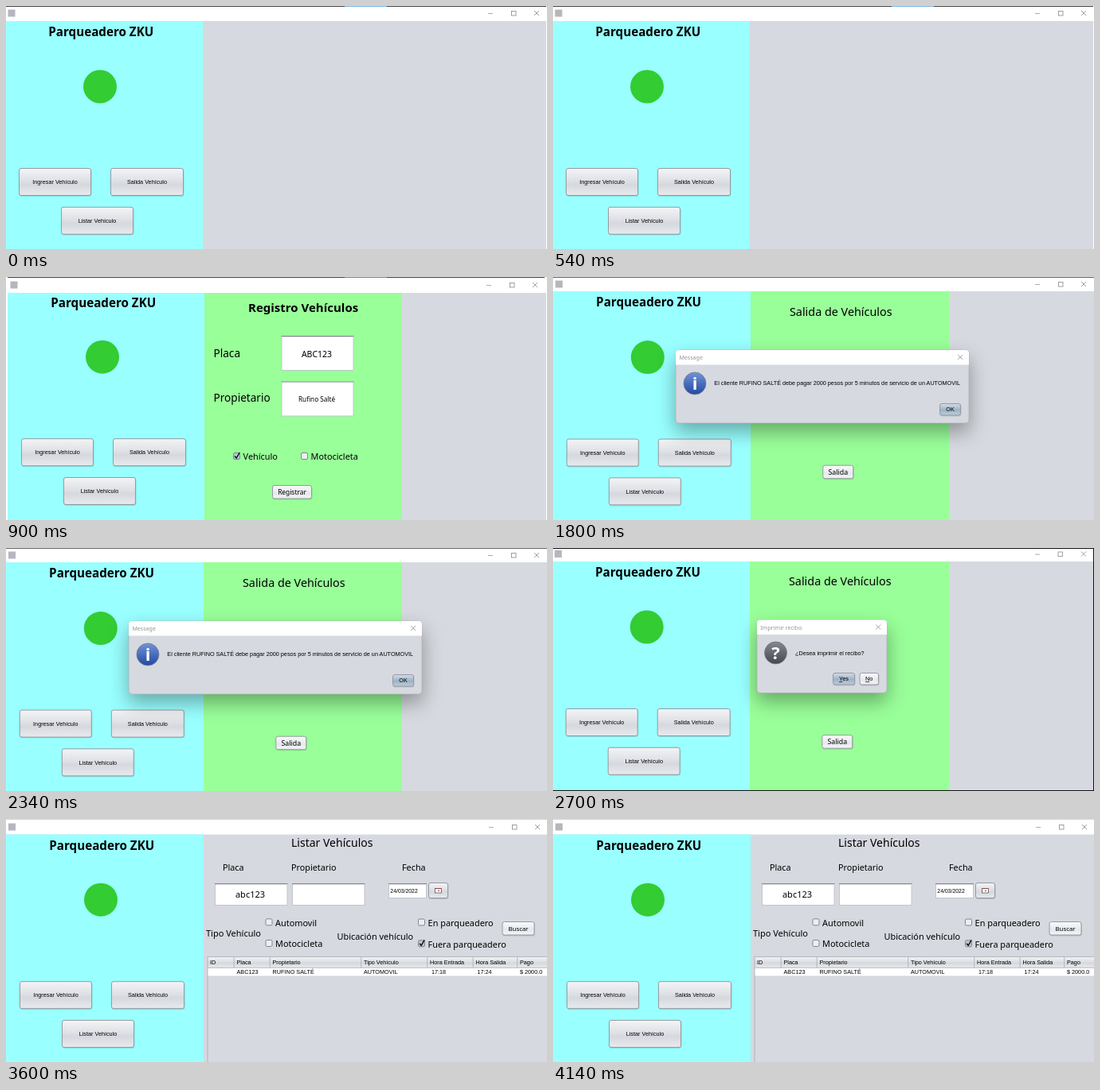
An HTML page that plays this animation: 679 px wide and 306 px high, repeating every 4.5 s.

```html
<!DOCTYPE html>
<html lang="es">
<head>
<meta charset="utf-8">
<title>Parqueadero</title>
<style>
  html, body { margin: 0; width: 100%; height: 100%; overflow: hidden; background: #fff; }
  svg { display: block; width: 679px; height: 306px; }
  text { font-family: "Noto Sans", sans-serif; white-space: pre; }
  .arial { font-family: "Liberation Sans", Arial, sans-serif; }
  .bold { font-weight: bold; }
  .mid { text-anchor: middle; }
  .grey { fill: #959595; }
  .shadow { filter: drop-shadow(0 11px 12px #0005); }
</style>
</head>
<body>
<svg id="stage" viewBox="0 0 679 306">
  <defs>
    <linearGradient id="button" x2="0" y2="1">
      <stop stop-color="#f3f4f6"/><stop offset=".45" stop-color="#dfe1e6"/>
      <stop offset=".6" stop-color="#d5d8de"/><stop offset="1" stop-color="#e8eaed"/>
    </linearGradient>
    <linearGradient id="light" x2="0" y2="1">
      <stop stop-color="#fafafb"/><stop offset=".6" stop-color="#e6e8ec"/><stop offset="1" stop-color="#f4f5f7"/>
    </linearGradient>
    <linearGradient id="active" x2="0" y2="1">
      <stop stop-color="#d3dde7"/><stop offset=".55" stop-color="#9db2c6"/><stop offset="1" stop-color="#bccddb"/>
    </linearGradient>
    <linearGradient id="info" x2="0" y2="1"><stop stop-color="#6f94d8"/><stop offset="1" stop-color="#2348a4"/></linearGradient>
    <linearGradient id="question" x2="0" y2="1"><stop stop-color="#85888e"/><stop offset="1" stop-color="#45484e"/></linearGradient>
  </defs>
</svg>
<script>
const STEP = 900, SMALL = 7.25;
const CYAN = '#99ffff', GREEN = '#99ff99', GREY = '#d6d9df';

const rect = (x, y, w, h, fill, extra = '') =>
  `<rect x="${x}" y="${y}" width="${w}" height="${h}" fill="${fill}" ${extra}/>`;
const path = (d, color, width = 1) =>
  `<path d="${d}" fill="none" stroke="${color}" stroke-width="${width}"/>`;
const text = (x, y, size, str, cls = '') =>
  `<text x="${x}" y="${y}" font-size="${size}" class="${cls}">${str}</text>`;
const arial = (x, y, str, cls = '') => text(x, y, SMALL, str, 'arial ' + cls);
const move = (x, y, body) => `<g transform="translate(${x} ${y})">${body}</g>`;
const cross = (x, y, color) => path(`M${x - 3} ${y - 3}l6 6m0 -6l-6 6`, color, .8);

function button(x, y, w, h, label, size = SMALL, cls = 'arial', fill = 'button') {
  return rect(x + .5, y + 1, w, h, '#0002', 'rx="3"') +
    rect(x + .5, y + .5, w - 1, h - 1, `url(#${fill})`, 'rx="2.5" stroke="#969aa2"') +
    text(x + w / 2, y + h / 2 + size * .36, size, label, cls + ' mid');
}

const smallButton = (x, y, w, label, size) => button(x, y, w, 17.5, label, size, '', 'light');

const field = (x, y, w, h) =>
  rect(x + .5, y + .5, w - 1, h - 1, '#fff', 'stroke="#c3c6cc"') +
  path(`M${x} ${y + .5}h${w}`, '#84878d') + path(`M${x + 1} ${y + 1.5}h${w - 2}`, '#dcdee1');

const check = (x, y, label, on) =>
  rect(x + .5, y + .5, 8, 8, on ? '#b9c9d8' : '#eceef1', 'rx="1.5" stroke="#80858e"') +
  (on ? path(`M${x + 2} ${y + 4.5}l2.2 2.5l4 -7`, '#111', 1.5) : '') +
  text(x + 12.6, y + 9.3, 10.9, label);

// Window chrome and the left menu; "dx, dy" shift the menu slightly between screens.
function shell({ left = 0, top, split, dx, dy, titleY, icon, controls, body = '' }) {
  const [min, max, close, y] = controls;
  return rect(0, 0, 679, 306, '#fff') +
    rect(left, top, 679, 306, GREY) + rect(left, top, split - left, 306, CYAN) +
    rect(icon - 4.5, y - 4.5, 9, 9, '#b4b7bd') +
    path(`M${min - 3} ${y + .5}h6`, '#999', .8) +
    rect(max - 2.5, y - 2.5, 5.5, 5.5, 'none', 'stroke="#888" stroke-width=".8"') +
    cross(close, y, '#888') +
    text(53.3 + dx, titleY, 15.2, 'Parqueadero ZKU', 'bold') +
    move(dx, dy, '<circle cx="118" cy="101.5" r="21" fill="#33cc33"/>' +
      button(16, 204, 91, 35, 'Ingresar Vehículo') +
      button(131, 204, 92, 35, 'Salida Vehículo') +
      button(69, 252.8, 91, 35, 'Listar Vehículo')) +
    body;
}

const dialog = (x, y, w, h, title, body) =>
  `<g class="shadow">${rect(x, y, w, h, GREY, 'rx="4" stroke="#a8abb0" stroke-width=".6"')}</g>` +
  `<path d="M${x} ${y + 18.5}v-14.5q0 -4 4 -4h${w - 8}q4 0 4 4v14.5z" fill="#fff"/>` +
  text(x + 4.4, y + 12, 7.1, title, 'grey') + cross(x + w - 10.8, y + 9, '#888') + body;

const badge = (x, y, fill, sign) =>
  `<circle cx="${x}" cy="${y}" r="14" fill="url(#${fill})" stroke="#777c88" stroke-width=".8"/>` +
  `<g fill="#fff">${text(x, y + 8, 22, sign, 'bold mid')}</g>`;

const exitPanel = (left, top, x, y) =>
  rect(left, top, 497 - left, 306, GREEN) +
  text(x, y, 14.35, 'Salida de Vehículos') +
  smallButton(x + 41.3, y + 188, 39, 'Salida', 8.8);

const topLine = color => path('M0 .5H679', color);

const home = shell({
  top: 19, split: 247, dx: 0, dy: 0, titleY: 38, icon: 7, controls: [608, 637, 666, 9],
  body: topLine('#444') + path('M425 .5h53', '#78b4e6') + rect(678, 0, 1, 306, '#fff')
});

const register = shell({
  left: 2, top: 20, split: 249, dx: 3, dy: -.8, titleY: 38.3, icon: 10, controls: [606, 635, 664, 10],
  body: path('M2 .5H676', '#444') + path('M425 .5h53', '#5b8fc0') + rect(676, 0, 3, 20, '#fff') +
    rect(678, 0, 1, 306, '#fff') + rect(249, 20, 247, 286, GREEN) +
    text(304, 43.5, 15, 'Registro Vehículos', 'bold') +
    text(260.5, 101, 13.6, 'Placa') + text(260.5, 157, 13.6, 'Propietario') +
    field(345.5, 74, 91, 44) + field(345.5, 131.5, 91, 44) +
    text(390, 100.5, 10.5, 'ABC123', 'mid') + text(390, 157, 8.2, 'Rufino Salté', 'mid') +
    check(285, 221, 'Vehículo', true) + check(370, 221, 'Motocicleta') +
    smallButton(334, 262, 50, 'Registrar', 8.4)
});

const message = shell({
  top: 18, split: 248, dx: .8, dy: -.4, titleY: 37.2, icon: 7.5, controls: [608, 637, 666, 9],
  body: topLine('#666') + exitPanel(248, 18, 297, 48.7) +
    dialog(154, 92, 368, 92, 'Message',
      badge(178, 134, 'info', 'i') +
      arial(202.3, 136.3, 'El cliente RUFINO SALTÉ debe pagar 2000 pesos por 5 minutos de servicio de un AUTOMOVIL') +
      button(485, 159, 27, 15.5, 'OK', SMALL, 'arial', 'active'))
});

const receipt = shell({
  top: 17, split: 247, dx: -.3, dy: -2, titleY: 35.8, icon: 6.5, controls: [608, 636.5, 666, 7.5],
  body: topLine('#111') + exitPanel(247, 17, 296, 47.2) +
    path('M678.5 0V306M0 305.5H679', '#111') +
    dialog(256, 90.5, 163, 92, 'Imprimir recibo',
      badge(279.5, 132, 'question', '?') +
      arial(304, 135, '¿Desea imprimir el recibo?') +
      button(351, 157, 28, 15.5, '<tspan text-decoration="underline">Y</tspan>es', SMALL, 'arial', 'active') +
      button(384.5, 157, 24.5, 15.5, '<tspan text-decoration="underline">N</tspan>o', SMALL, 'arial', 'light'))
});

const columns = [
  [256, 'ID', ''], [289.5, 'Placa', 'ABC123'], [334.5, 'Propietario', 'RUFINO SALTÉ'],
  [449, 'Tipo Vehículo', 'AUTOMOVIL'], [532, 'Hora Entrada', ' 17:18'],
  [589.5, 'Hora Salida', ' 17:24'], [645, 'Pago', '$ 2000.0']
];
const table = rect(253, 173, 426, 14, 'url(#button)') + rect(253, 187, 426, 10.5, '#fff') +
  path('M253 306V173.5H679M253 187.3H679', '#a4a8b0', .8) +
  columns.map(([x, head, cell], i) =>
    (i ? path(`M${x - 3.3} 174v13`, '#a9adb5', .8) : '') +
    arial(x, 183, head) + arial(x, 194.7, cell)).join('');

const list = shell({
  top: 19.5, split: 248, dx: 1, dy: .2, titleY: 38.5, icon: 7.5, controls: [609, 638, 667, 10],
  body: topLine('#d8d8d8') +
    text(358, 34.5, 14, 'Listar Vehículos') +
    text(272, 65, 10.8, 'Placa') + text(358, 65, 10.8, 'Propietario') + text(497, 65, 10.8, 'Fecha') +
    field(262, 81, 91.5, 28) + field(359, 81, 91.5, 28) + field(480, 81, 48, 19) +
    text(306.5, 99, 11, 'abc123', 'mid') + text(482.3, 93, 6.9, '24/03/2022', 'arial') +
    button(530, 80, 25, 20, '') +
    rect(538.5, 87.5, 8, 5.5, '#fff', 'stroke="#555" stroke-width=".8"') +
    path('M538.5 87.5h8', '#8b4a4a') + path('M542 90.5h2', '#a33') +
    text(251, 148, 11, 'Tipo Vehículo') + text(415.5, 152, 10.9, 'Ubicación vehículo') +
    check(325.5, 125.3, 'Automovil') + check(325.5, 152, 'Motocicleta') +
    check(517, 125.5, 'En parqueadero') + check(517, 152.3, 'Fuera parqueadero', true) +
    smallButton(622.5, 129, 41, 'Buscar', 7.8) + table
});

const stage = document.getElementById('stage');
const screens = [home, register, message, receipt, list].map(markup => {
  const group = document.createElementNS('http://www.w3.org/2000/svg', 'g');
  group.innerHTML = markup;
  return stage.appendChild(group);
});

function draw() {
  const current = Math.floor(performance.now() / STEP) % screens.length;
  screens.forEach((g, i) => g.style.display = i === current ? '' : 'none');
  requestAnimationFrame(draw);
}
draw();
</script>
</body>
</html>
```
